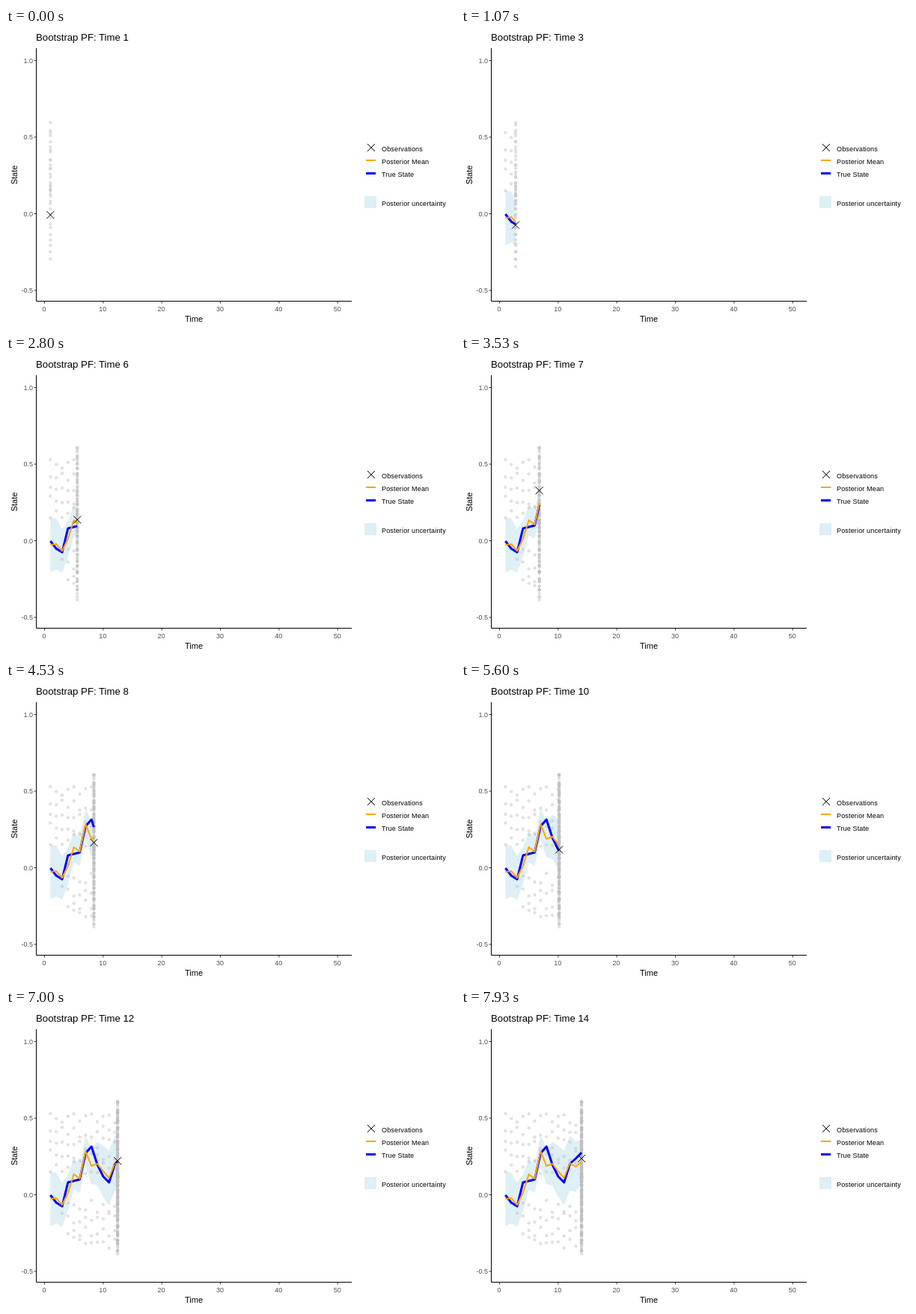
An HTML page for the animation above (8 s loop, 600 by 400 pixels).

```html
<!DOCTYPE html>
<html lang="en">
<head>
<meta charset="utf-8">
<title>Bootstrap PF</title>
<style>
  html, body { margin: 0; width: 100%; height: 100%; overflow: hidden; background: #fff; }
  svg { display: block; width: 600px; height: 400px; }
  text { font: 9px "Liberation Sans", Arial, sans-serif; letter-spacing: .16px; }
  #title { font-size: 13.2px; letter-spacing: 0; }
  .label { font-size: 11px; letter-spacing: 0; text-anchor: middle; }
  .tick text { fill: #4d4d4d; letter-spacing: 0; }
  .tick path { stroke: #333; }
  .xt text { text-anchor: middle; }
  .yt text { text-anchor: end; }
  path { fill: none; stroke-linejoin: round; }
  .dots { fill: #bebebe; fill-opacity: .4; stroke: #bebebe; stroke-opacity: .4; stroke-width: .9; }
  .band { fill: #deeff5; }
  .mean { stroke: #ffa500; stroke-width: 2; }
  .state { stroke: #00f; stroke-width: 3; }
  .cross { stroke: #000; stroke-width: 1; }
</style>
</head>
<body>
<svg id="stage" viewBox="0 0 600 400">
  <text id="title" x="40" y="17"></text>
  <path id="band" class="band"/>
  <g id="fixed" class="dots"></g>
  <g id="carried" class="dots"></g>
  <path id="state" class="state"/>
  <path id="mean" class="mean"/>
  <path id="obs" class="cross" d="M-5-5L5 5M-5 5L5-5"/>
  <path d="M40.5 27V365.5H462" stroke="#000"/>
  <g id="xticks" class="tick xt"></g>
  <g id="yticks" class="tick yt"></g>
  <text class="label" x="251" y="393">Time</text>
  <text class="label" transform="translate(15 196.5) rotate(-90)">State</text>
  <path class="cross" d="M483 155L493 165M483 165L493 155"/>
  <path class="mean" d="M481 177H494"/>
  <path class="state" d="M481 194.5H494"/>
  <rect class="band" x="479" y="225" width="16" height="16"/>
  <text x="502" y="164.5">Observations</text>
  <text x="502" y="181.5">Posterior Mean</text>
  <text x="502" y="198.5">True State</text>
  <text x="502" y="237.5">Posterior uncertainty</text>
</svg>
<script>
const LOOP = 8000, FRAMES = 120, STEP = 49 / 449, GAIN = 1.6;

// Key points, one per time step, in stage pixels
const mean = [254, 253, 262, 246, 221, 227, 190, 210, 207, 217, 226, 206, 211, 204];
const state = [249, 259, 264, 232, 230, 228, 193, 184, 208, 224, 232, 207, 200, 192];

// Each observation pulls the mean part of the way towards itself
const obs = mean.map((m, i) => i ? mean[i - 1] + GAIN * (m - mean[i - 1]) : 250);

// The uncertainty narrows early, then widens again
const spread = i => 28 + 9 * Math.cos((i - 10.5) * 2 * Math.PI / 11);
const upper = mean.map((m, i) => m - spread(i));
const lower = mean.map((m, i) => m + spread(i));

const $ = id => document.getElementById(id);
const px = t => 51.5 + 7.835 * t;

function add(parent, tag, attrs = {}, text) {
  const el = document.createElementNS("http://www.w3.org/2000/svg", tag);
  for (const k in attrs) el.setAttribute(k, attrs[k]);
  if (text !== undefined) el.textContent = text;
  parent.appendChild(el);
  return el;
}

let seed = 11;
function rand() {
  seed = (seed * 16807) % 2147483647;
  return seed / 2147483647;
}

// Particles that travel with the current time: dense middle, thin tails
function cloud(i) {
  const n = i ? 24 : 30, mid = i ? 225 : 218;
  const half = i ? 84 + 18 * rand() : 91;
  return Array.from({ length: n }, (_, j) => {
    const q = 2 * j / (n - 1) - 1;
    return mid + half * q * Math.abs(q) ** 0.4 + (rand() - 0.5) * 4;
  });
}

// Particles that stay behind: a group above the band and one below
function strays(i) {
  const group = (n, top) => Array.from({ length: n }, (_, j) => top + 16 * (j + rand()));
  return [...group(5, 140), ...group(Math.min(i, 4), 256)];
}

function column(parent, ys, x) {
  const g = add(parent, "g");
  for (const y of ys) add(g, "circle", { cx: x, cy: y, r: 1.8 });
  return g;
}

const fixedCols = mean.slice(1).map((_, i) => column($("fixed"), strays(i), px(i + 1)));
const carriedCols = mean.map((_, i) => column($("carried"), cloud(i), 0));

for (let v = 0; v <= 50; v += 10) {
  add($("xticks"), "path", { d: `M${px(v)} 366v2.5` });
  add($("xticks"), "text", { x: px(v) - 0.6, y: 379 }, v);
}
for (const v of [1, 0.5, 0, -0.5]) {
  const y = 248.5 - 205 * v;
  add($("yticks"), "path", { d: `M37.5 ${y}h2.5` });
  add($("yticks"), "text", { x: 36, y: y + 3.2 }, v.toFixed(1));
}

function at(series, t) {
  const i = Math.min(Math.floor(t), series.length - 1) - 1;
  return series[i] + (series[i + 1] - series[i]) * (t - 1 - i);
}

function trace(series, t) {
  const pts = [];
  for (let k = 1; k < t; k++) pts.push([px(k), series[k - 1]]);
  pts.push([px(t), at(series, t)]);
  return pts;
}

const toPath = pts => pts.length > 1 ? "M" + pts.map(p => p.join(" ")).join("L") : "";

function showUntil(cols, t) {
  cols.forEach((g, i) => g.setAttribute("display", i + 1 <= t ? "inline" : "none"));
}

function draw(ms) {
  // Steps fall on hundredths of a second, hence the small lead
  const frame = Math.floor((ms + 4) * FRAMES / LOOP) % FRAMES;
  const t = 1 + frame * STEP;
  $("title").textContent = "Bootstrap PF: Time " + Math.round(t);
  $("mean").setAttribute("d", toPath(trace(mean, t)));
  $("state").setAttribute("d", toPath(trace(state, t)));
  const edge = trace(upper, t).concat(trace(lower, t).reverse());
  $("band").setAttribute("d", toPath(edge));
  $("obs").setAttribute("transform", `translate(${px(t)} ${at(obs, t)})`);
  $("carried").setAttribute("transform", `translate(${px(t)} 0)`);
  showUntil(fixedCols, t);
  showUntil(carriedCols, t);
}

const start = performance.now();
function tick() {
  draw((performance.now() - start) % LOOP);
  requestAnimationFrame(tick);
}
tick();
</script>
</body>
</html>
```
